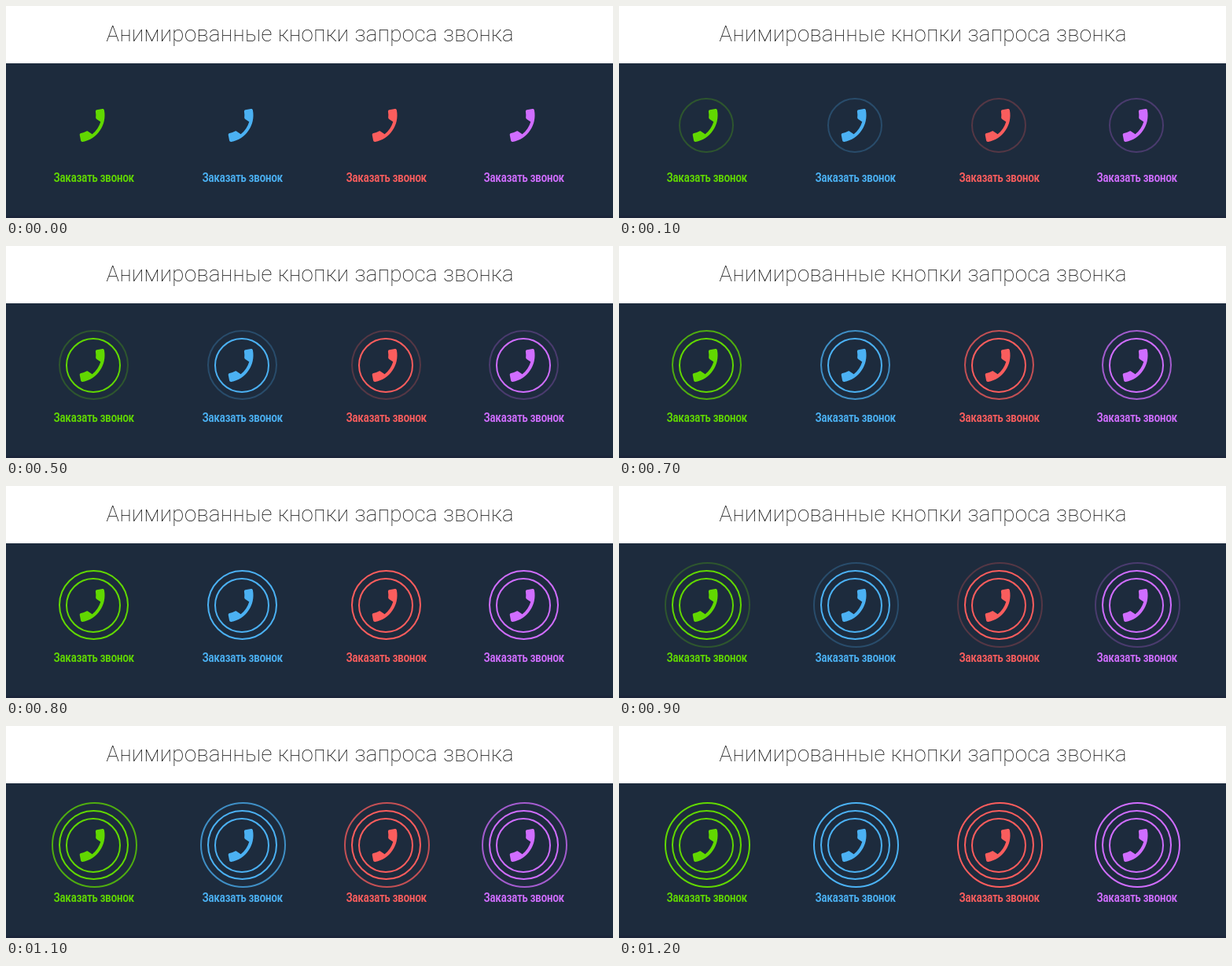
Animation, 772 px wide and 270 px high, one loop 1.3 s. Source, as an HTML page with a canvas:

```html
<!DOCTYPE html>
<html lang="ru">
<head>
<meta charset="utf-8">
<title>Анимированные кнопки запроса звонка</title>
<style>
  html, body { margin: 0; width: 100%; height: 100%; overflow: hidden; background: #1d2b3d; }
  canvas, svg { position: absolute; left: 0; top: 0; display: block; }
  text { white-space: pre; }
  .title {
    font-family: Roboto, sans-serif;
    font-weight: 130;
    letter-spacing: .015em;
  }
  .label {
    font-family: "Roboto Condensed", "Open Sans Condensed", "Liberation Sans Narrow", Roboto, sans-serif;
    font-weight: 500;
    font-stretch: 75%;
    font-variation-settings: "wdth" 75;
    letter-spacing: -.03em;
  }
</style>
</head>
<body>
<canvas id="stage" width="772" height="270"></canvas>
<svg id="texts" width="772" height="270"></svg>
<script>
const ctx = document.getElementById('stage').getContext('2d');
const texts = document.getElementById('texts');
const LOOP = 1300, STEP = 100, FADE_STEPS = 4;

const buttons = [
  { x: 0, color: '#61d800' },
  { x: 189, color: '#4bb1f3' },
  { x: 372, color: '#fb5d5d' },
  { x: 547, color: '#d06dff' }
];

const rings = [
  { x: 111, y: 152, r: 34 },
  { x: 111.5, y: 151.5, r: 43.5 },
  { x: 112.5, y: 151.5, r: 53.5 }
];

// Handset on a 24 unit grid, mirrored and tilted when drawn.
const handset = new Path2D(
  'M6.62 10.79c1.44 2.83 3.76 5.14 6.59 6.59l2.2-2.2c.27-.27.67-.36 1.02-.24 ' +
  '1.12.37 2.33.57 3.57.57.55 0 1 .45 1 1V20c0 .55-.45 1-1 1' +
  'C10.61 21 3 13.39 3 4c0-.55.45-1 1-1h3.5c.55 0 1 .45 1 1 ' +
  '0 1.25.2 2.45.57 3.57.11.35.03.74-.25 1.02z'
);

// Adds a line of text at the font size whose natural length is the given one.
function addText(str, cls, color, x, baseline, length) {
  const el = document.createElementNS('http://www.w3.org/2000/svg', 'text');
  el.textContent = str;
  el.setAttribute('class', cls);
  el.setAttribute('fill', color);
  el.setAttribute('x', x);
  el.setAttribute('y', baseline);
  el.style.fontSize = '100px';
  texts.append(el);
  el.style.fontSize = 100 * length / el.getComputedTextLength() + 'px';
}

addText('Анимированные кнопки запроса звонка', 'title', '#000', 127.5, 45, 519);
for (const { x, color } of buttons) {
  addText('Заказать звонок', 'label', color, x + 60.5, 224, 102.5);
}

function drawHandset() {
  ctx.save();
  ctx.translate(110, 152);
  ctx.rotate(-0.188);
  ctx.scale(-2.03, 2.03);
  ctx.translate(-12, -12);
  ctx.fill(handset);
  ctx.restore();
}

function drawButton({ x, color }, step) {
  ctx.save();
  ctx.translate(x, 0);
  ctx.fillStyle = ctx.strokeStyle = color;
  ctx.lineWidth = 2;
  drawHandset();
  rings.forEach((ring, i) => {
    ctx.globalAlpha = Math.max(0, Math.min(1, step / FADE_STEPS - i));
    ctx.beginPath();
    ctx.arc(ring.x, ring.y, ring.r, 0, 2 * Math.PI);
    ctx.stroke();
  });
  ctx.restore();
}

function draw(now) {
  const step = Math.floor((now % LOOP) / STEP);
  ctx.fillStyle = '#fff';
  ctx.fillRect(0, 0, 772, 73);
  ctx.fillStyle = '#1d2b3d';
  ctx.fillRect(0, 73, 772, 197);
  ctx.fillStyle = '#1b2539';
  ctx.fillRect(0, 267, 772, 3);
  buttons.forEach(b => drawButton(b, step));
}

const start = performance.now();
function tick() {
  draw(performance.now() - start);
  requestAnimationFrame(tick);
}
tick();
</script>
</body>
</html>
```
